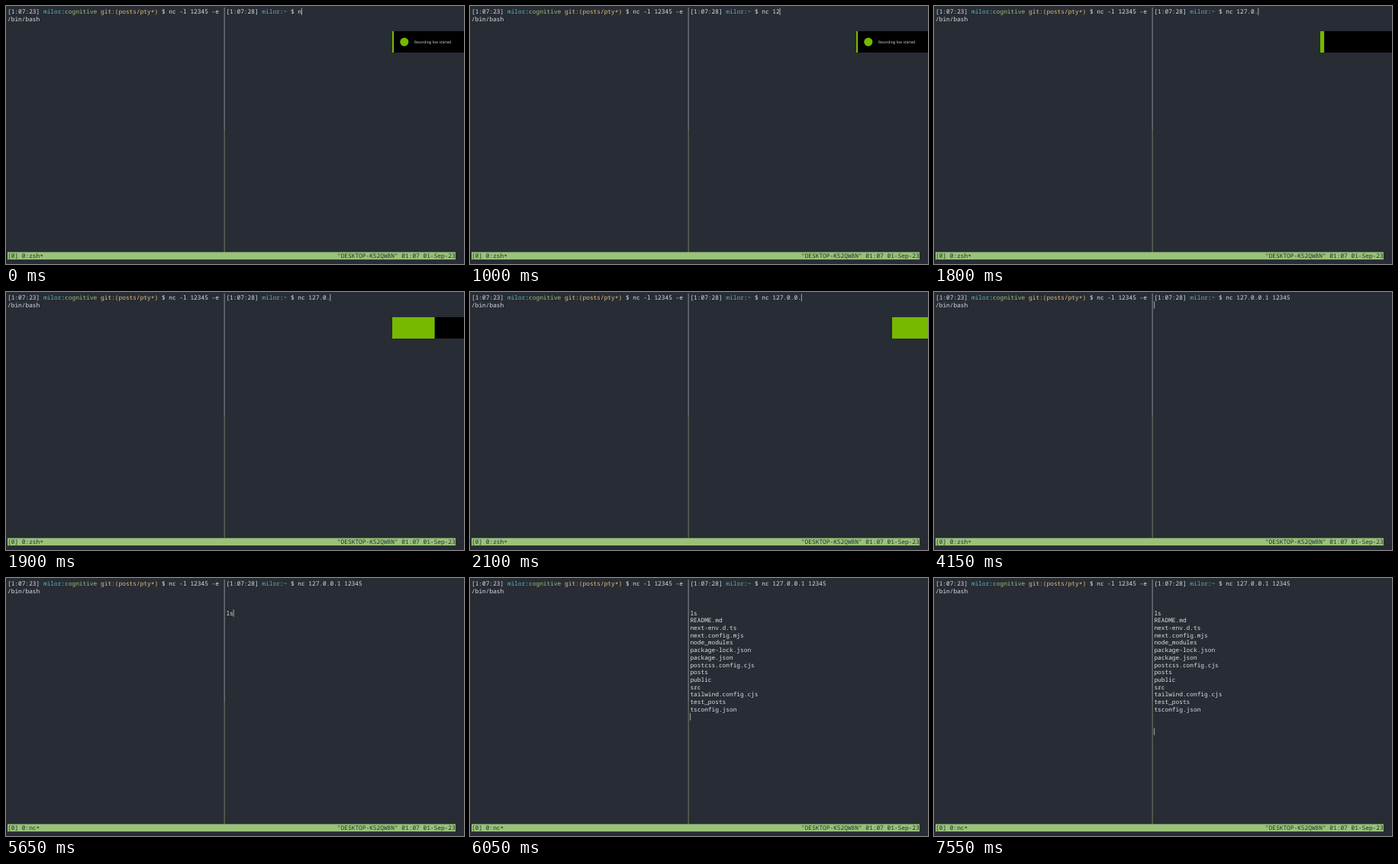
An HTML page for the animation above (8000 ms loop, 600x338 px).

```html
<!DOCTYPE html>
<html lang="en">
<head>
<meta charset="utf-8">
<title>Terminal</title>
<style>
html, body { margin: 0; width: 100%; height: 100%; overflow: hidden; background: #282c34; }
svg { display: block; width: 100%; height: 100%; }
text { font: 7.825px "Noto Sans Mono", "DejaVu Sans Mono", monospace; white-space: pre; text-rendering: geometricPrecision; }
#toast text { font: 4.75px "Open Sans", "Noto Sans", sans-serif; }
</style>
</head>
<body>
<svg id="stage" viewBox="0 0 600 338"></svg>
<script>
const LOOP = 8000, STEP = 50;
const CELL = 4.695, LINE = 9.7, LEFT = 2, TOP = 2.3;
const RIGHT_PANE = 61, STATUS_ROW = 33;
const WHITE = '#dcdfe4', GREEN = '#98c379', CYAN = '#56b6c2', YELLOW = '#e5c07b', DARK = '#282c34', LIME = '#76b900';
const stage = document.getElementById('stage');

function add(tag, attrs, parent = stage) {
  const node = document.createElementNS('http://www.w3.org/2000/svg', tag);
  for (const key in attrs) node.setAttribute(key, attrs[key]);
  return parent.appendChild(node);
}
const box = (x, y, width, height, fill, parent) => add('rect', { x, y, width, height, fill }, parent);
const colX = col => LEFT + col * CELL;
const rowY = row => TOP + row * LINE;

function print(col, row, str, fill = WHITE, drop = 0) {
  const node = add('text', { x: colX(col), y: rowY(row) + 7.5 + drop, fill });
  node.textContent = str;
  return node;
}
function printRun(col, row, parts) {
  for (const [str, fill, drop] of parts) {
    print(col, row, str, fill, drop);
    col += str.length;
  }
}
const show = (node, on) => node.setAttribute('visibility', on ? 'visible' : 'hidden');
const count = (times, t) => times.filter(at => at <= t).length;
function smooth(t, from, to) {
  const p = Math.min(1, Math.max(0, (t - from) / (to - from)));
  return p * p * (3 - 2 * p);
}

// Panes
box(0, 0, 600, 338, DARK);
box(285.7, 2, 0.8, 160, '#a4a8ac');
box(285.7, 162, 0.8, 160.4, '#7f9a6b');
printRun(0, 0, [
  ['[1:07:23] '], ['milor', CYAN], [':'], ['cognitive ', GREEN],
  ['git:(posts/pty', YELLOW], ['*', YELLOW, 1.3], [') ', YELLOW], ['$ nc -l 12345 -e']
]);
print(0, 1, '/bin/bash');
printRun(RIGHT_PANE, 0, [['[1:07:28] '], ['milor', CYAN], [':'], ['~', GREEN], [' $ ']]);

// Status bar
box(LEFT, rowY(STATUS_ROW), 586.9, LINE, GREEN);
print(0, STATUS_ROW, '[0] 0:', DARK);
const job = print(6, STATUS_ROW, 'zsh', DARK);
const star = print(9, STATUS_ROW, '*', DARK, 1.3);
print(92, STATUS_ROW, '"DESKTOP-K52QW8N" 01:07 01-Sep-23', DARK);

// Right pane session
const COMMAND = 'nc 127.0.0.1 12345';
const PROMPT_END = RIGHT_PANE + 20;
const keyTimes = [0, 200, 350, 700, 850, 1250, 1500, 1600, 1750, 1950, 2100,
  2450, 2650, 2750, 2900, 3150, 3400, 3650];
const enterTimes = [4150, 4550, 4700, 4850];
const lsTimes = [5550, 5650];
const OUTPUT_AT = 5800;
const blankTimes = [6550, 6700];
const files = ['README.md', 'next-env.d.ts', 'next.config.mjs', 'node_modules',
  'package-lock.json', 'package.json', 'postcss.config.cjs', 'posts', 'public',
  'src', 'tailwind.config.cjs', 'test_posts', 'tsconfig.json'];

const command = print(PROMPT_END, 0, '');
const ls = print(RIGHT_PANE, 4, '');
const listing = files.map((name, i) => print(RIGHT_PANE, 5 + i, name));
const cursor = box(0, 0, 0.8, 9.4, '#c4c7cc');

// Notification
const toast = add('g', { id: 'toast' });
const lime = box(506, 33, 94, 28, LIME, toast);
const black = box(508, 33, 92, 28, '#000', toast);
const message = add('g', {}, toast);
add('circle', { cx: 521.8, cy: 47.1, r: 5.6, fill: LIME }, message);
add('text', { x: 535, y: 49.1, fill: '#e8e8e8' }, message).textContent = 'Recording has started';

function slide(rect, from, p) {
  const x = from + (600 - from) * p;
  rect.setAttribute('x', x);
  rect.setAttribute('width', 600 - x);
}

function draw(time) {
  const t = Math.floor(time / STEP) * STEP;
  const typed = count(keyTimes, t), letters = count(lsTimes, t);
  const listed = t >= OUTPUT_AT;
  command.textContent = COMMAND.slice(0, typed);
  ls.textContent = 'ls'.slice(0, letters);
  listing.forEach(node => show(node, listed));

  let row = count(enterTimes, t);
  let col = row ? RIGHT_PANE + letters : PROMPT_END + typed;
  if (listed) {
    row = 5 + files.length + count(blankTimes, t);
    col = RIGHT_PANE;
  }
  cursor.setAttribute('x', colX(col) - 0.1);
  cursor.setAttribute('y', rowY(row) + 0.2);

  const nc = t >= 5000;
  job.textContent = nc ? 'nc' : 'zsh';
  star.setAttribute('x', colX(nc ? 8 : 9));

  show(toast, t < 2200);
  message.setAttribute('opacity', t < 1750 ? 1 : 0);
  slide(black, 508, smooth(t, 1775, 2000));
  slide(lime, 506, smooth(t, 2000, 2200));
}

const start = performance.now();
function tick() {
  draw((performance.now() - start) % LOOP);
  requestAnimationFrame(tick);
}
tick();
</script>
</body>
</html>
```
